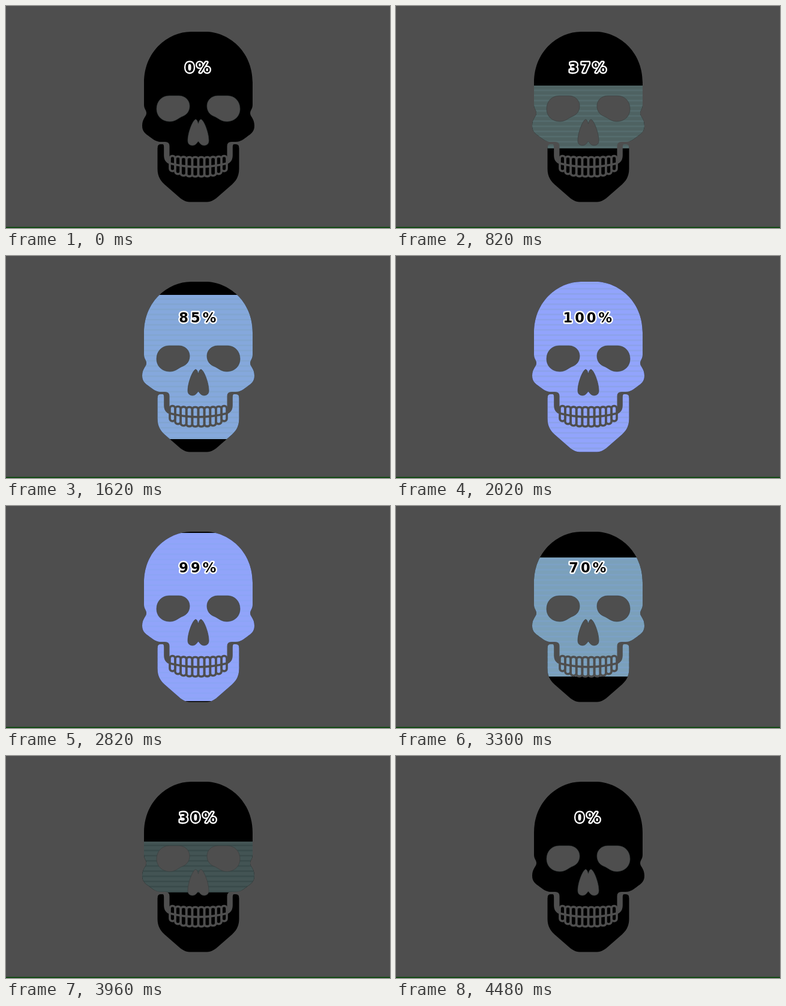
An HTML page that plays this animation: 640x371 px, repeating every 4500 ms.

```html
<!DOCTYPE html>
<html lang="en">
<head>
<meta charset="utf-8">
<title>Skull loader</title>
<style>
  html, body { margin: 0; width: 100%; height: 100%; overflow: hidden; background: #4e4e4e; }
  svg { display: block; width: 100%; height: 100%; }
  .hole { fill: #4e4e4e; }
  .rim { stroke: #3a3f3f; stroke-width: .7; }
  .gap { fill: none; stroke: #4e4e4e; stroke-width: 3.6; }
  text {
    font: bold 22.5px "DejaVu Sans", sans-serif;
    letter-spacing: 4px;
    text-anchor: middle;
    fill: #000;
    stroke: #fff;
    stroke-width: 4.8px;
    stroke-linejoin: round;
    paint-order: stroke;
  }
</style>
</head>
<body>
<svg viewBox="0 0 640 371">
  <defs>
    <path id="side" d="M321 43H308C272 43 230 74 230 128V165C230 172 234 174 234 179
      C234 185 227 188 227 200C227 210 232 213 240 219C246 223.5 250 226 252.5 226V272
      C252.5 287 260 294 264 298L288 319C296 326 301 327.5 309 327.5H321Z"/>
    <clipPath id="skull">
      <use href="#side"/>
      <use href="#side" transform="matrix(-1 0 0 1 641 0)"/>
    </clipPath>
    <pattern id="lines" width="8" height="8.6" patternUnits="userSpaceOnUse">
      <rect id="line" y="2" width="8" height="2.4"/>
    </pattern>
    <g id="holes" class="hole">
      <path class="rim" d="M272 150H288C299 150 306 158 306 167C306 175 302 181 295 184
        C287 187 283 193 273 193C260 193 251 184 251 172C251 159 260 150 272 150Z"/>
      <path class="rim" d="M320.5 197C319.5 193 318 189.5 316 189.5C311 191 303 212 303 225
        C303 231 307 233 311 233C316 233 318 229 320.5 226"/>
      <path d="M246 224C250 226 254 227 258 227H265Q272.5 227 272.5 234V264
        C266 262 263.2 256 263.2 250V236Q263.2 231 261 231H258Q252.5 231 252.5 237H246Z"/>
    </g>
  </defs>
  <rect width="640" height="371" fill="#4e4e4e"/>
  <g clip-path="url(#skull)">
    <rect x="220" y="40" width="201" height="292"/>
    <rect class="band" id="fill" x="220" width="201"/>
    <rect class="band" x="220" width="201" fill="url(#lines)"/>
  </g>
  <use href="#holes"/>
  <use href="#holes" transform="matrix(-1 0 0 1 641 0)"/>
  <path class="hole" d="M319.5 197H321.5V226H319.5Z"/>
  <g id="teeth" class="gap"><path d="M273 263Q320.5 275 368 263"/></g>
  <text id="label" x="321.3" y="111.2">0%</text>
  <rect y="369.3" width="640" height="1.7" fill="#08480a"/>
</svg>
<script>
  const LOOP = 4500, RAMP = 1660, RISE = 204, FALL = 2808;
  const MID = 185.5, HEIGHT = 284.5, AXIS = 320.5;
  const COLORS = [
    [0, 0, 0, 0], [30, 67, 84, 84], [37, 78, 98, 98],
    [70, 123, 160, 186], [85, 133, 168, 220], [100, 146, 164, 252]
  ];
  const $ = id => document.getElementById(id);
  const clamp = v => Math.min(1, Math.max(0, v));
  const mix = (a, b, k) => a + (b - a) * k;
  const bands = document.querySelectorAll('.band');

  // Teeth get narrower and shorter towards the corners of the mouth
  const toothEdge = k => AXIS + k * (10.2 - .14 * Math.abs(k));
  for (let k = -5; k < 5; k++) {
    const shrink = (Math.abs(k + .5) / 4.5) ** 3;
    const x = toothEdge(k), y = 252.5 - 2 * shrink;
    const tooth = document.createElementNS('http://www.w3.org/2000/svg', 'rect');
    const box = {
      x, y, width: toothEdge(k + 1) - x, height: 285 - 9 * shrink - y, rx: 4.2
    };
    for (const key in box) tooth.setAttribute(key, box[key]);
    $('teeth').append(tooth);
  }

  function percent(t) {
    const level = t < FALL ? (t - RISE) / RAMP : 1 - (t - FALL) / RAMP;
    return Math.floor(clamp(level) * 100);
  }

  function bandColor(p) {
    const i = Math.max(1, COLORS.findIndex(c => c[0] >= p));
    const a = COLORS[i - 1], b = COLORS[i];
    const k = (p - a[0]) / (b[0] - a[0]);
    return `rgb(${[1, 2, 3].map(n => Math.round(mix(a[n], b[n], k)))})`;
  }

  function lineColor(p, falling) {
    if (!falling) return 'rgba(115,150,160,.2)';
    const k = clamp((p - 30) / 40);
    return `rgba(${mix(25, 125, k)},${mix(40, 165, k)},${mix(40, 230, k)},.25)`;
  }

  function draw(now) {
    const t = now % LOOP;
    const p = percent(t);
    const half = HEIGHT * p / 200;
    const top = Math.round(MID - half), bottom = Math.round(MID + half);
    for (const band of bands) {
      band.setAttribute('y', top);
      band.setAttribute('height', p ? bottom - top : 0);
    }
    $('fill').style.fill = bandColor(p);
    $('line').style.fill = lineColor(p, t >= FALL);
    $('label').textContent = p + '%';
  }

  const start = performance.now();
  function tick() {
    draw(performance.now() - start);
    requestAnimationFrame(tick);
  }
  tick();
</script>
</body>
</html>
```
